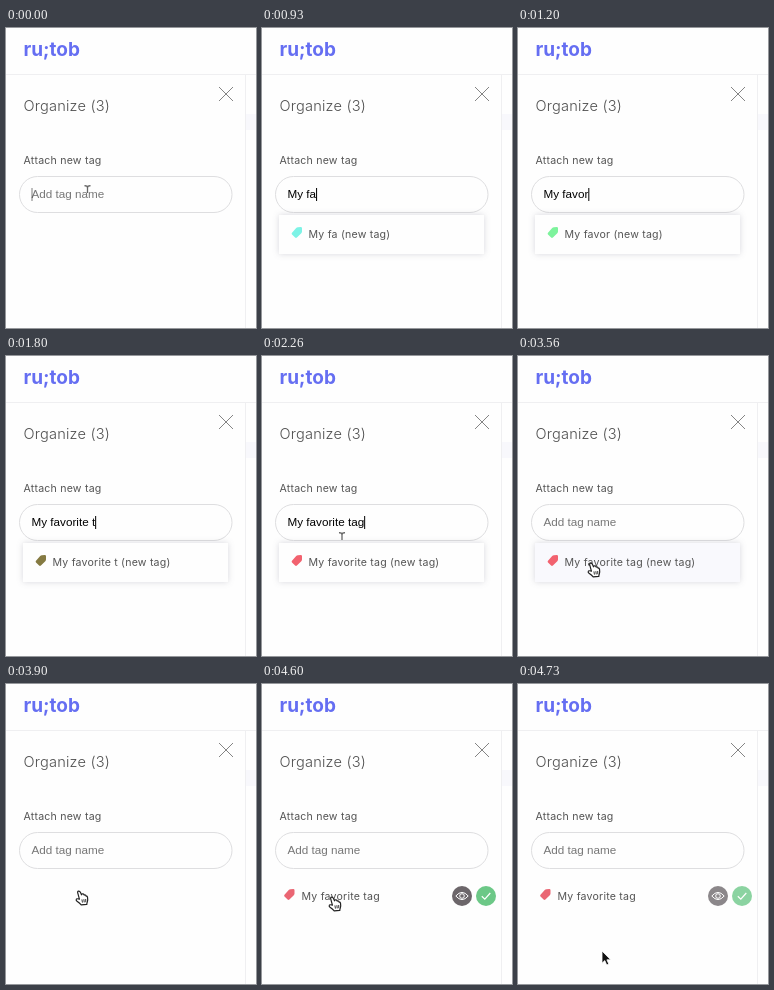
An HTML page that plays this animation: 250 by 300 pixels, repeating every 4900 ms.

```html
<!DOCTYPE html>
<html lang="en">
<head>
<meta charset="utf-8">
<title>Attach a tag</title>
<style>
  html, body { margin: 0; width: 100%; height: 100%; overflow: hidden; background: #fefefe; }
  svg { display: block; width: 250px; height: 300px; }
  text { font-family: Inter, "Open Sans", sans-serif; font-size: 10.6px; letter-spacing: .2px; fill: #555; white-space: pre; }
  .logo { font-size: 19px; font-weight: 650; letter-spacing: 0; fill: #656ef2; }
  .title { font-size: 14.6px; font-weight: 350; fill: #505050; }
  .field { font-family: "Liberation Sans", Arial, sans-serif; font-size: 11.7px; letter-spacing: 0; }
  #menuBox { filter: drop-shadow(0 0 3px rgba(60, 60, 90, .2)); }
</style>
</head>
<body>
<svg viewBox="0 0 250 300">
  <defs>
    <path id="tag" d="M5.2 .9Q5.9 .2 6.9 .2L9.8 0Q11 0 11 1.2L11 4.6Q10.9 5.6 10.3 6.2L5.9 10.5Q5 11.3 4.1 10.5L1 7.6Q.2 6.7 1 5.8Z"/>
  </defs>

  <rect width="250" height="300" fill="#fefefe"/>
  <rect x="240" y="86" width="10" height="16" fill="#f8f8fc"/>
  <path d="M0 46.5H250M239.5 47V300" stroke="#efeff1" fill="none"/>
  <text class="logo" x="17.5" y="28">ru;tob</text>
  <text class="title" x="17.5" y="83">Organize (3)</text>
  <path d="M213 59L227 73M227 59L213 73" stroke="#777" stroke-width=".9"/>
  <text x="17.5" y="136">Attach new tag</text>

  <rect x="13.5" y="148.5" width="212.5" height="36" rx="18" fill="#fefefe" stroke="#dedee0"/>
  <text class="field" id="input" x="25.5" y="170"></text>
  <rect id="caret" y="160" width="1" height="13" fill="#000"/>

  <g id="menu">
    <rect id="menuBox" x="17" y="187" width="205" height="39"/>
    <use id="menuTag" href="#tag" x="29" y="199"/>
    <text id="menuText" x="46.5" y="210"></text>
  </g>

  <g id="row">
    <use href="#tag" x="21.5" y="205" fill="#ea6673"/>
    <text x="39.5" y="216">My favorite tag</text>
    <g id="buttons" fill="none" stroke="#fff">
      <circle cx="200" cy="212" r="10" fill="#6c666a" stroke="none"/>
      <path d="M193.8 212Q200 204.8 206.2 212Q200 219.2 193.8 212Z"/>
      <circle cx="200" cy="212" r="2.3"/>
      <circle cx="224" cy="212" r="10" fill="#6cc887" stroke="none"/>
      <path d="M219.8 212.3L222.8 215.2L228.3 209" stroke-width="1.2"/>
    </g>
  </g>

  <g id="beam" fill="none" stroke="#666">
    <path d="M-3 -3.2Q0 -3.4 0 -1.6Q0 -3.4 3 -3.2" stroke-width="1.5"/>
    <path d="M0 -2V4" stroke-width="1.3"/>
  </g>
  <path id="arrow" d="M0 0V12.2L2.8 9.6L4.7 14L6.8 13.1L4.9 8.8H8.7Z" fill="#111" stroke="#fff" stroke-width=".8"/>
  <g id="hand" stroke="#222" stroke-width="1.2" stroke-linejoin="round" stroke-linecap="round">
    <path d="M-1.2 1.2Q-1.8 -.6 -.4 -.9Q.8 -1.1 1.5 .5L2.5 2.8Q2.7 1.5 4 1.8Q4.9 2 5.2 3.2Q5.9 2.5 6.7 3.2L7.2 4.2Q8.2 4 8.5 5.2Q9 8 8.3 10Q7.8 11 7.8 12.4L2.2 12.8Q.6 11 -2 9.3Q-3.4 8 -2.6 7.1Q-1.6 6.4 .4 7.2Z" fill="#fff"/>
    <path d="M3 7.8L3.4 10.2M4.9 7.6L5.2 10M6.7 7.4L6.8 9.8" fill="none" stroke-width=".9"/>
  </g>
</svg>
<script>
const LOOP = 4900;
const PHRASE = "My favorite tag";
const $ = id => document.getElementById(id);

// time, letters typed, colour of the tag
const typing = [
  [0, 0, "none"],
  [200, 1, "#f5a97d"], [330, 2, "#7da8f5"], [500, 3, "#7da8f5"],
  [730, 4, "#d98af0"], [930, 5, "#7df3e6"], [1060, 6, "#f0c85a"],
  [1130, 7, "#6c8ee0"], [1200, 8, "#7df39c"], [1360, 9, "#e08a5a"],
  [1430, 10, "#5ab4d8"], [1560, 11, "#a878d8"], [1660, 12, "#a878d8"],
  [1800, 13, "#857a42"], [1830, 14, "#58b088"], [1900, 15, "#f2626f"],
  [3560, 0, "#f2626f"]
];

// time, pointer, x, y
const pointer = [
  [0, "beam", 81.5, 161], [200, "", 0, 0],
  [2130, "beam", 81, 166], [2200, "beam", 81, 172], [2230, "beam", 80, 180],
  [2300, "hand", 78, 191], [2330, "hand", 76, 199], [2360, "hand", 74, 204],
  [2430, "hand", 73, 208],
  [4600, "hand", 70, 214], [4630, "hand", 68, 226],
  [4660, "arrow", 71, 241], [4700, "arrow", 79, 258], [4730, "arrow", 84, 267]
];

const caretAlpha = [[0, .5], [200, 1], [2630, 0], [2900, .4], [2930, 0]];
const rowAlpha = [[0, 0], [3930, .25], [3960, .5], [4030, .8], [4060, 1]];
const buttonAlpha = [[0, 1], [4630, .94], [4660, .88], [4700, .82], [4730, .78]];

const at = (track, t) => track.findLast(k => k[0] <= t);

const pen = document.createElement("canvas").getContext("2d");
pen.font = '11.7px "Liberation Sans", Arial, sans-serif';

const show = (id, on) => $(id).setAttribute("display", on ? "inline" : "none");

function draw(t) {
  const [, count, color] = at(typing, t);
  const typed = PHRASE.slice(0, count);
  $("input").textContent = typed || "Add tag name";
  $("input").style.fill = typed ? "#000" : "#777";
  $("caret").setAttribute("x", 25.5 + pen.measureText(typed).width);
  $("caret").setAttribute("opacity", at(caretAlpha, t)[1]);

  show("menu", t >= 200 && t < 3600);
  $("menuBox").setAttribute("fill", t >= 2300 ? "#f9f9fd" : "#fefefe");
  $("menuTag").setAttribute("fill", color);
  $("menuText").textContent = (typed || PHRASE).trim() + " (new tag)";

  $("row").setAttribute("opacity", at(rowAlpha, t)[1]);
  $("buttons").setAttribute("opacity", at(buttonAlpha, t)[1]);

  const [, kind, x, y] = at(pointer, t);
  for (const id of ["beam", "arrow", "hand"]) {
    show(id, id === kind);
    $(id).setAttribute("transform", `translate(${x} ${y})`);
  }
}

const start = performance.now();
function tick() {
  draw((performance.now() - start) % LOOP);
  requestAnimationFrame(tick);
}
tick();
</script>
</body>
</html>
```
